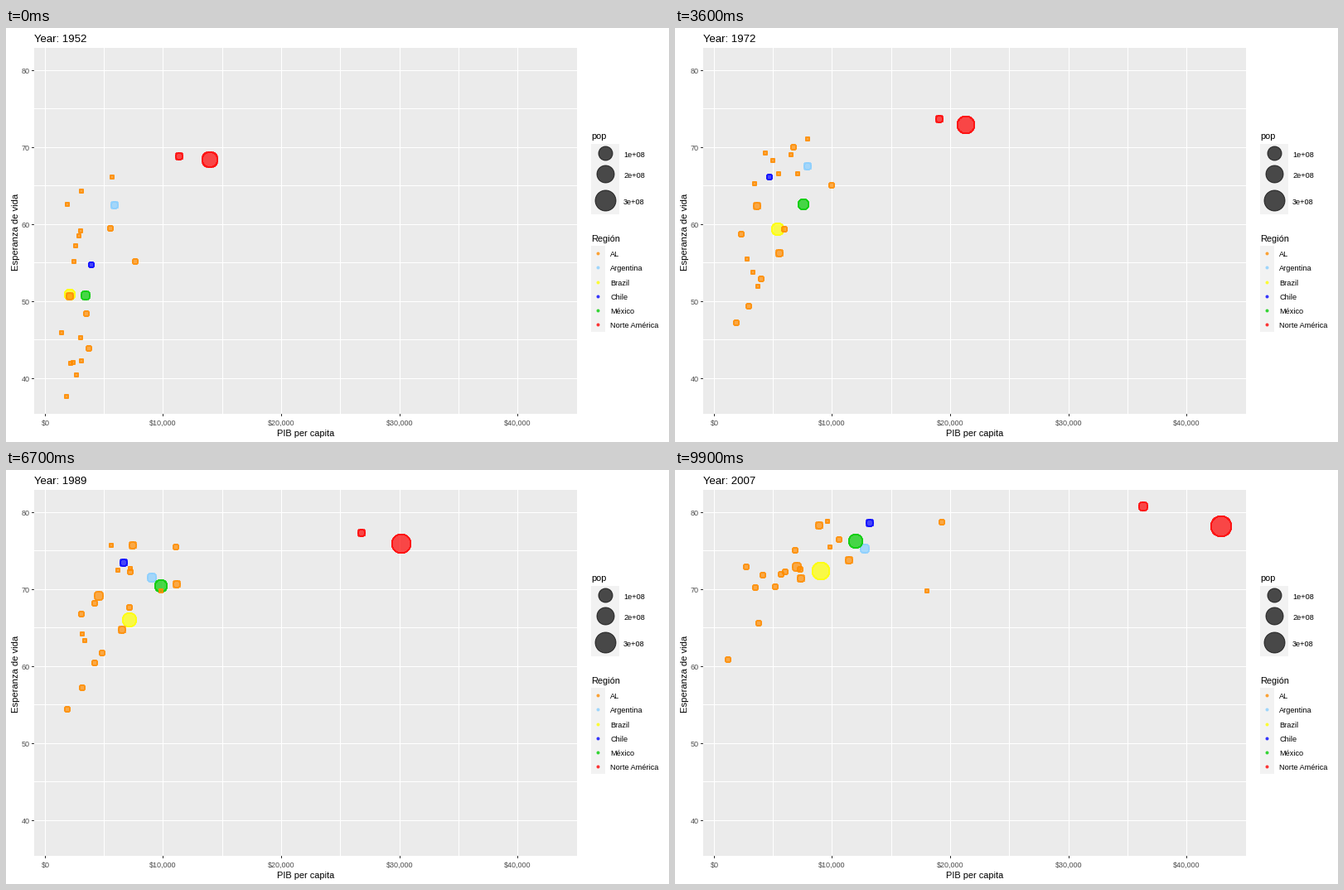
Animation of 800 by 500 pixels, one loop 10 s. Source, as a matplotlib script:

```python
import matplotlib.pyplot as plt
import numpy as np
from matplotlib.animation import FuncAnimation
from matplotlib.colors import to_rgba
from matplotlib.patches import Rectangle

plt.rcParams["font.family"] = "Liberation Sans"

W, H, DPI = 800, 500, 100
PT = 72 / DPI  # points per pixel
FRAMES, INTERVAL = 100, 100
START, MIDDLE, END = 1952, 1982, 2007
ALPHA = 0.7
LEFT, TOP, RIGHT, BOTTOM = 34, 24, 689, 466

# Colour, population growth over the whole loop, easing power of late GDP growth
REGIONS = {
    "AL": ("#FF8C00", 3, 2),
    "Argentina": ("#87CEFF", 2.25, 3),
    "Brazil": ("#FFFF00", 3.36, 2),
    "Chile": ("#0000FF", 2.55, 1.3),
    "México": ("#00CD00", 3.6, 2),
    "Norte América": ("#FF0000", 1.91, 1),
}

fig = plt.figure(figsize=(W / DPI, H / DPI), dpi=DPI, facecolor="white")
ax = fig.add_axes([0, 0, 1, 1])
ax.set(xlim=(0, W), ylim=(H, 0))
ax.axis("off")


def px_x(gdp):
    """GDP in thousands of dollars to whole pixels."""
    return np.round(46.6 + 14.27 * np.asarray(gdp))


def px_y(life):
    return np.round(423 - 9.305 * (np.asarray(life) - 40))


def diameter(size):
    return 2 * np.round(0.375 * (size * 2.845 + 0.945))


def pop_diameter(pop):
    share = np.clip((np.asarray(pop) - 0.66) / (301.14 - 0.66), 0, 1)
    return diameter(2 + 10 * np.sqrt(share))


def area(d):
    """Marker area whose one-pixel outline stays inside diameter d."""
    return ((np.asarray(d) - 1) * PT) ** 2


def rect(x, y, w, h, color):
    ax.add_patch(Rectangle((x, y), w, h, fc=color, lw=0, antialiased=False, zorder=1))


def label(x, y, s, size=9, color="black", **kw):
    return ax.text(x, y, s, fontsize=size * PT, color=color, va="baseline", **kw)


def dots(x, y, d, colors):
    return ax.scatter(x, y, s=area(d), c=colors, edgecolors=colors,
                      linewidths=PT, antialiaseds=False, zorder=3)


# Panel, grid and axes
rect(LEFT, TOP, RIGHT - LEFT, BOTTOM - TOP, "#EBEBEB")
for gdp in range(0, 45, 5):
    x = px_x(gdp)
    rect(x, TOP, 1, BOTTOM - TOP, "white")
    if gdp % 10 == 0:
        rect(x, BOTTOM, 1, 3, "#333333")
        label(x + 0.5, 480, f"\\${gdp * 1000:,}", color="#4D4D4D", ha="center")
for life in range(40, 81, 5):
    y = px_y(life)
    rect(LEFT, y, RIGHT - LEFT, 1, "white")
    if life % 10 == 0:
        rect(LEFT - 3, y, 3, 1, "#333333")
        label(29, y + 4, str(life), color="#4D4D4D", ha="right")
label(362, 493, "PIB per capita", 11, ha="center")
label(15, 246.5, "Esperanza de vida", 11.3, ha="center",
      rotation=90, rotation_mode="anchor")
title = label(LEFT, 17, "", 13.2)

# Legends
label(706, 134, "pop", 11)
rect(706, 140, 34, 85, "#F2F2F2")
for n, y in zip((1, 2, 3), (151, 176, 208)):
    dots([723], [y], pop_diameter([100 * n]), [to_rgba("black", ALPHA)])
    label(745, y + 5, f"{n}e+08", 9.2)
label(706, 258, "Región", 11)
rect(706, 263, 17, 104, "#F2F2F2")
for i, (name, (color, *_)) in enumerate(REGIONS.items()):
    y = np.round(272 + 17.28 * i)
    dots([714], [y], [diameter(1.5)], [to_rgba(color, ALPHA)])
    label(729, y + 4, name, 9.2)

countries = []


def add(region, pop, *poses):
    """First population in millions; (GDP, life) at START, MIDDLE and END."""
    color, growth, power = REGIONS[region]
    gdp, life = zip(*poses)
    curve = np.polyfit((START, MIDDLE, END), life, 2)
    countries.append((to_rgba(color, ALPHA), pop, growth, power, gdp, curve))


add("Argentina", 17.9, (5.91, 62.5), (9, 69.9), (12.78, 75.3))
add("AL", 2.9, (2.68, 40.4), (3.16, 53.9), (3.82, 65.6))
add("Brazil", 56.6, (2.11, 50.9), (7.03, 63.3), (9.07, 72.4))
add("Norte América", 14.8, (11.37, 68.8), (22.9, 75.8), (36.32, 80.7))
add("Chile", 6.4, (3.94, 54.7), (5.1, 70.6), (13.17, 78.6))
add("AL", 12.4, (2.14, 50.6), (4.4, 66.7), (7.01, 72.9))
add("AL", 0.9, (2.63, 57.2), (5.26, 73.4), (9.65, 78.8))
add("AL", 6, (5.59, 59.4), (7.32, 73.7), (8.95, 78.3))
add("AL", 2.5, (1.4, 45.9), (2.86, 63.7), (6.03, 72.2))
add("AL", 3.6, (3.52, 48.4), (7.21, 64.3), (6.87, 75))
add("AL", 2, (3.05, 45.3), (4.1, 56.6), (5.73, 71.9))
add("AL", 3.1, (2.43, 42), (4.82, 58.1), (5.19, 70.3))
add("AL", 3.2, (1.84, 37.6), (2.01, 51.5), (1.2, 60.9))
add("AL", 1.5, (2.19, 41.9), (3.12, 60.9), (3.55, 70.2))
add("AL", 1.4, (2.9, 58.5), (6.07, 71.2), (7.32, 72.6))
add("México", 30.1, (3.48, 50.8), (9.61, 67.4), (11.98, 76.2))
add("AL", 1.2, (3.11, 42.3), (3.47, 59.3), (2.75, 72.9))
add("AL", 0.9, (2.48, 55.2), (7.01, 70.5), (9.81, 75.5))
add("AL", 1.6, (1.95, 62.6), (4.26, 66.9), (4.17, 71.8))
add("AL", 8, (3.76, 43.9), (6.43, 61.4), (7.41, 71.4))
add("AL", 2.2, (3.08, 64.3), (10.33, 73.8), (19.33, 78.7))
add("AL", 0.7, (3.02, 59.1), (9.12, 68.8), (18.01, 69.8))
add("Norte América", 157.6, (13.99, 68.4), (25.01, 74.7), (42.95, 78.2))
add("AL", 2.2, (5.72, 66.1), (6.92, 70.8), (10.61, 76.4))
add("AL", 5.4, (7.69, 55.1), (11.15, 68.6), (11.42, 73.7))

colors, *columns = zip(*countries)
pop, growth, power, gdp, curves = map(np.array, columns)
gdp_start, gdp_middle, gdp_end = gdp.T
blank = np.zeros(len(countries))
cloud = dots(blank, blank, blank + 2, list(colors))


def update(i):
    t = i / (FRAMES - 1)
    year = START + (END - START) * t
    early = min((year - START) / (MIDDLE - START), 1)
    late = max((year - MIDDLE) / (END - MIDDLE), 0)
    income = (gdp_start + (gdp_middle - gdp_start) * early
              + (gdp_end - gdp_middle) * late ** power)
    life = np.polyval(curves.T, year)
    cloud.set_offsets(np.column_stack([px_x(income), px_y(life)]))
    cloud.set_sizes(area(pop_diameter(pop * growth ** t)))
    title.set_text(f"Year: {round(year)}")
    return cloud, title


anim = FuncAnimation(fig, update, frames=FRAMES, interval=INTERVAL, repeat=True)
plt.show()
```
